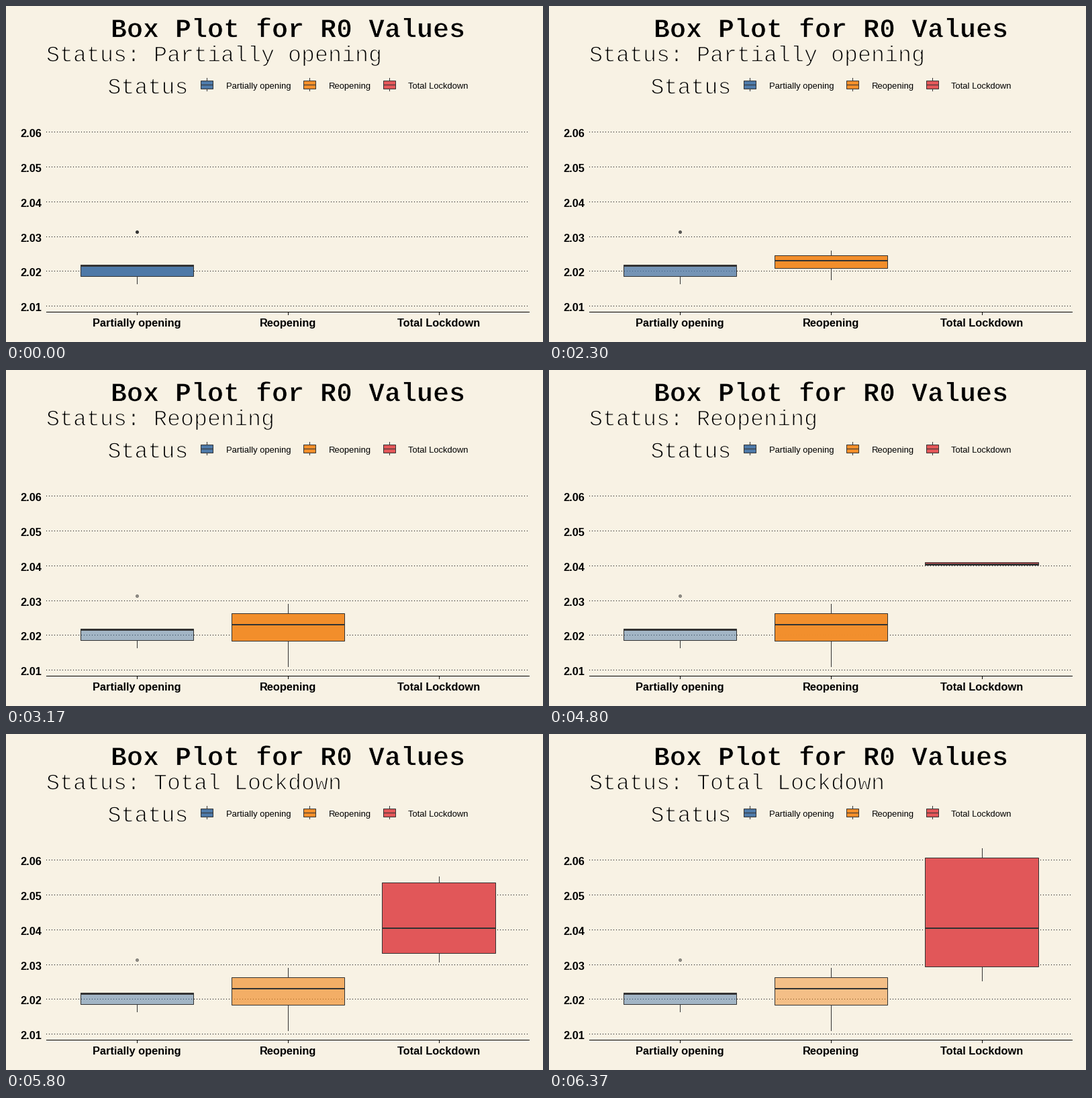
Write a matplotlib script that moves like this. It is 800 px wide and 500 px high and loops after 10 s.

```python
import math

import matplotlib.pyplot as plt
from matplotlib.animation import FuncAnimation
from matplotlib.colors import to_rgba
from matplotlib.patches import Circle, Rectangle
from matplotlib.patheffects import Stroke

W, H, DPI = 800, 500, 100
PX = 72 / DPI                      # one pixel in points
LOOP_MS, INTERVAL = 10000, 25
FPS = 30
FADE_STEPS = 48

PAPER, INK, EDGE = "#f8f2e4", "black", "#333333"
STATES = ["Partially opening", "Reopening", "Total Lockdown"]
COLORS = ["#4e79a7", "#f28e2b", "#e15759"]
CENTERS = [195.5, 420.5, 645]

plt.rcParams["path.snap"] = False

fig = plt.figure(figsize=(W / DPI, H / DPI), dpi=DPI, facecolor=PAPER)
ax = fig.add_axes([0, 0, 1, 1])
ax.set_axis_off()
ax.set_xlim(0, W)
ax.set_ylim(H, 0)
ax.autoscale(False)


def line(xs, ys, color=EDGE, width=1, z=2, style="-", cap="butt"):
    return ax.plot(xs, ys, color=color, lw=width * PX, ls=style, zorder=z,
                   solid_capstyle=cap, dash_capstyle="butt")[0]


def label(x, y, s, size, family="Liberation Sans", weight="normal",
          ha="left", thin=0):
    """Text on a baseline; thin trims the strokes by that many pixels."""
    t = ax.text(x, y, s, fontsize=size * PX, family=family, weight=weight,
                ha=ha, va="baseline", color=INK)
    if thin:
        t.set_path_effects([Stroke(linewidth=thin * PX, foreground=PAPER)])
    return t


def rect(x, y, w, h, color):
    return ax.add_patch(Rectangle((x, y), w, h, fc=color, ec=EDGE,
                                  lw=PX, joinstyle="miter", zorder=3))


def pixel(v):
    return math.floor(v) + 0.5


class Box:
    """Box with whiskers that grows out of its median."""

    def __init__(self, x, half, color, high, q3, median, q1, low):
        self.color = color
        self.median = median
        self.stats = high, q3, q1, low
        self.body = rect(x - half, median, 2 * half, 0, color)
        mid = pixel(x)
        self.upper = line([mid, mid], [median, median], cap="projecting")
        self.lower = line([mid, mid], [median, median], cap="projecting")
        self.bar = line([x - half, x + half], [median, median],
                        width=2, z=4)

    def show(self, grow, alpha):
        high, q3, q1, low = (pixel(self.median + (v - self.median) * grow)
                             for v in self.stats)
        self.body.set_y(q3)
        self.body.set_height(q1 - q3)
        self.body.set_facecolor(to_rgba(self.color, alpha))
        self.upper.set_ydata([min(high, q3), q3])
        self.lower.set_ydata([q1, low])
        for part in (self.body, self.lower, self.bar):
            part.set_visible(grow > 0)
        self.upper.set_visible(grow > 0 and high < q3)


def draw_legend():
    label(151.5, 130.5, "Status", 33.33, "Liberation Mono", thin=1.2)
    for x, text_x, name, color in zip((299.5, 452.5, 571.5),
                                      (327.5, 480.5, 599), STATES, COLORS):
        line([x, x], [107, 127])
        rect(x - 9, 111.5, 18, 12, color)
        line([x - 9, x + 9], [117.5, 117.5], z=4)
        label(text_x, 123, name, 13)


def draw_axes():
    for i in range(6):
        y = pixel(187.6 + 51.8 * i)
        line([60, 780], [y, y], INK, z=1, style=(0, (1, 3)))
        label(53.5, y + 7.5, f"{2.06 - 0.01 * i:.2f}", 16.4,
              weight="bold", ha="right")
    line([60, 780], [455.5, 455.5], INK)
    for x, name in zip(CENTERS, STATES):
        line([pixel(x)] * 2, [455, 460], INK)
        label(math.floor(x), 477, name, 16.4, weight="bold", ha="center")


label(420, 46.5, "Box Plot for R0 Values", 40, "Liberation Mono",
      "bold", "center", thin=0.9)
subtitle = label(60, 82.5, "", 33.33, "Liberation Mono", thin=1.2)
draw_legend()
draw_axes()

partial = Box(CENTERS[0], 84, COLORS[0], 385.5, 385.5, 387, 402.5, 413.5)
reopen = Box(CENTERS[1], 84, COLORS[1], 348, 362, 379, 403.5, 441.5)
lockdown = Box(CENTERS[2], 84.5, COLORS[2], 170, 184.5, 289, 346.5, 367.5)
outlier = ax.add_patch(Circle((195.5, 336.5), 2, lw=PX, zorder=3))


def progress(step, start):
    return min(max((step - start + 1) / FADE_STEPS, 0), 1)


def update(i):
    step = math.floor((i * INTERVAL + 20) * FPS / 1000)
    second, third = progress(step, 48), progress(step, 144)
    faded = 1 - second / 2

    partial.show(1, faded)
    outlier.set_facecolor(to_rgba(EDGE, faded))
    outlier.set_edgecolor(to_rgba(EDGE, faded))
    reopen.show(second, 1 - third / 2)
    lockdown.show(third, 1)

    current = (second > 0.5) + (third > 0.5)
    subtitle.set_text("Status: " + STATES[current])
    return []


anim = FuncAnimation(fig, update, frames=LOOP_MS // INTERVAL,
                     interval=INTERVAL, repeat=True, repeat_delay=0,
                     blit=False)
plt.show()
```
